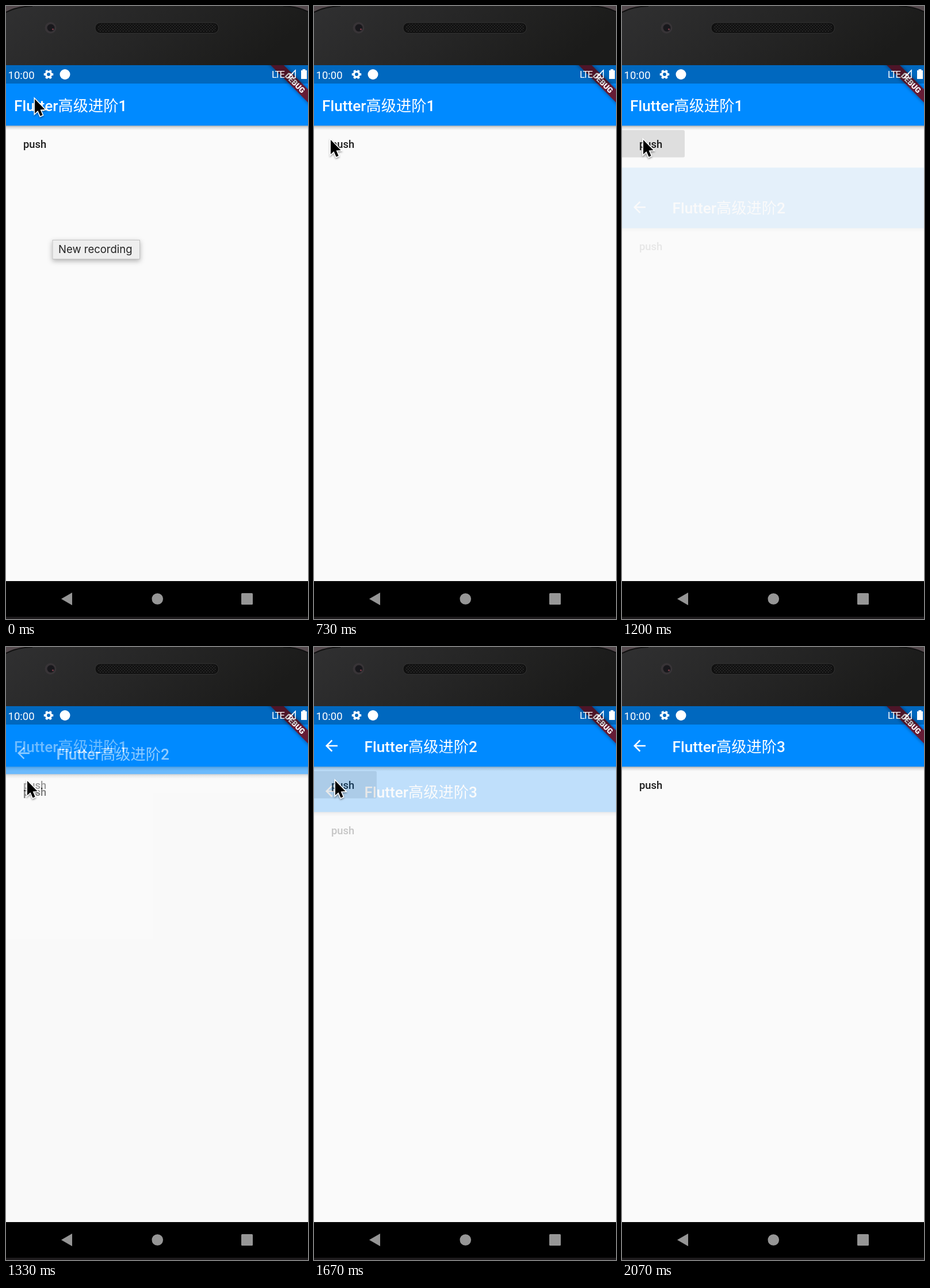
Write an HTML page that moves like this. It is 525x1067 px and loops after 2140 ms.

```html
<!DOCTYPE html>
<html lang="zh-CN">
<head>
<meta charset="utf-8">
<title>Page transitions</title>
<style>
  html, body { margin: 0; width: 100%; height: 100%; overflow: hidden; background: #000; }
  svg { display: block; width: 100%; height: 100%; }
  text { font-family: Roboto, "Noto Sans CJK SC", "Noto Sans CJK", sans-serif; white-space: pre; }
  .title { font-size: 26.25px; font-weight: 500; fill: #fff; }
  .title tspan { font-weight: 400; }
  .label { font-size: 18.4px; font-weight: 500; fill: #1c1c1c; }
</style>
</head>
<body>
<svg viewBox="0 0 525 1067">
  <defs>
    <linearGradient id="body" x1="0" y1="0" x2="1" y2=".25">
      <stop offset="0" stop-color="#303031"/><stop offset=".5" stop-color="#262626"/><stop offset="1" stop-color="#1b1b1a"/>
    </linearGradient>
    <linearGradient id="barShadow" x1="0" y1="0" x2="0" y2="1">
      <stop offset="0" stop-opacity=".3"/><stop offset=".4" stop-opacity=".12"/><stop offset="1" stop-opacity="0"/>
    </linearGradient>
    <pattern id="mesh" width="5" height="5" patternUnits="userSpaceOnUse">
      <circle cx="1.3" cy="1.3" r="1" fill="#303030"/><circle cx="3.8" cy="3.8" r="1" fill="#303030"/>
    </pattern>
    <filter id="soft" x="-50%" y="-80%" width="200%" height="300%">
      <feDropShadow dx="0" dy="3" stdDeviation="4" flood-opacity=".3"/>
    </filter>
    <filter id="cursorShadow" x="-60%" y="-40%" width="220%" height="200%">
      <feDropShadow dx="0" dy="2" stdDeviation="1.8" flood-opacity=".4"/>
    </filter>
    <filter id="bannerShadow" x="-20%" y="-60%" width="140%" height="220%">
      <feDropShadow dx="0" dy="0" stdDeviation="3" flood-opacity=".5"/>
    </filter>
    <clipPath id="screen"><path d="M0 103H525V1001H0z"/></clipPath>
    <clipPath id="button"><rect x="-8" y="216" width="117" height="47.5" rx="2.5"/></clipPath>
  </defs>

  <!-- phone body -->
  <rect width="525" height="110" fill="#554a4e"/>
  <path d="M0 110V11Q18 1 46 0H482Q508 1 525 10V110z" fill="url(#body)"/>
  <path d="M0 11Q18 1 46 0M482 0Q508 1 525 10" fill="none" stroke="#111" stroke-width="2"/>
  <circle cx="77.500" cy="38" r="10" fill="#383437"/>
  <circle cx="78" cy="38" r="6.500" fill="#19181c"/>
  <circle cx="81.500" cy="40.500" r="1.500" fill="#7a3d48"/>
  <rect x="155" y="29" width="214.500" height="18.500" rx="9" fill="#101010" stroke="#3a3a3a" stroke-width=".8"/>
  <rect x="159" y="31" width="207" height="14.500" rx="7" fill="url(#mesh)"/>

  <g clip-path="url(#screen)">
    <g id="pages"></g>
    <g transform="translate(502.500 134) rotate(45)">
      <rect x="-80" y="-8" width="160" height="16" fill="#661c34" filter="url(#bannerShadow)"/>
      <text y="4.800" text-anchor="middle" font-size="13.400" font-weight="900" fill="#fff">DEBUG</text>
    </g>
  </g>

  <!-- status bar -->
  <path d="M0 103H525V135H0z" opacity=".25"/>
  <g fill="#fff">
    <text x="3.500" y="126.500" font-size="18.500">10:00</text>
    <g transform="translate(74 119)" fill="none" stroke="#fff">
      <circle r="4.600" stroke-width="3.400"/>
      <circle r="7" stroke-width="2.600" pathLength="12" stroke-dasharray="1.1 .9" stroke-dashoffset=".55"/>
    </g>
    <circle cx="102.500" cy="119" r="9"/>
    <text x="462" y="125" font-size="16.500" letter-spacing="-1.500">LTE</text>
    <path d="M503 112V125H490z" fill="none" stroke="#fff" stroke-width="1.600"/>
    <path d="M493 117l6 6m0-6l-6 6" stroke="#fff" stroke-width="1.600"/>
    <path d="M513 112h2.500v-2h5v2h2.500v15h-10z"/>
  </g>

  <!-- navigation bar -->
  <path d="M0 1001H525V1067H0z"/>
  <path d="M0 1063H525V1067H0z" fill="#1d1a1c"/>
  <g fill="#969696">
    <path d="M96 1032L115 1021V1043z"/>
    <circle cx="263.300" cy="1032" r="9.800"/>
    <rect x="409" y="1022" width="20" height="20" rx="1.500"/>
  </g>

  <g id="tooltip">
    <rect x="81" y="407.500" width="151.500" height="33" fill="#eee" stroke="#c2c2c2" filter="url(#soft)"/>
    <text x="91" y="430" font-size="18.500" fill="#222" style="font-family:Inter,sans-serif">New recording</text>
  </g>
  <path id="cursor" d="M0 0V25L5.500 20L9.600 29.500L13.600 27.800L9.600 18.600L17.500 18z"
        stroke="#fff" stroke-width="3" paint-order="stroke" filter="url(#cursorShadow)"/>
</svg>

<script>
const LOOP = 2140, STEP = 200 / 3, SLIDE = 224;
const $ = id => document.getElementById(id);

// press: button goes down; push: the next page starts to enter
const transitions = [
  { press: 960, push: 1133.5, length: 282 },
  { press: 1425, push: 1539, length: 306 },
];
const cursorPath = [
  [0, 50, 162], [70, 47, 172], [270, 31, 226], [400, 27, 233], [667, 27, 233],
  [733, 29, 233], [867, 37, 233], [1667, 37, 233], [1733, 50, 192],
  [1800, 97, 39], [1867, 125, -8], [1933, 135, -45],
];

const clamp = v => Math.min(1, Math.max(0, v));
const ramp = (t, from, to) => clamp((t - from) / (to - from));

function bezier(x1, y1, x2, y2) {
  const at = (a, b, s) => 3 * a * s * (1 - s) ** 2 + 3 * b * s * s * (1 - s) + s ** 3;
  return x => {
    let low = 0, high = 1;
    for (let i = 0; i < 24; i++) {
      const mid = (low + high) / 2;
      if (at(x1, x2, mid) < x) low = mid; else high = mid;
    }
    return at(y1, y2, high);
  };
}
const fastOutSlowIn = bezier(.4, 0, .2, 1);
const easeIn = bezier(.42, 0, 1, 1);

const pageMarkup = n => `
  <g id="page${n}">
    <path d="M0 103H525V1240H0z" fill="#fafafa"/>
    <path d="M0 208H525V216H0z" fill="url(#barShadow)"/>
    <path d="M0 103H525V208.300H0z" fill="#008aff"/>
    ${n > 1 ? `<path transform="translate(14.700 156.200) scale(1.3125)" fill="#fff"
      d="M20 11H7.830l5.590-5.590L12 4l-8 8 8 8 1.410-1.410L7.830 13H20z"/>` : ''}
    <text class="title" x="${n > 1 ? 87.5 : 14}" y="183">Flutter<tspan>高级进阶</tspan>${n}</text>
    <g id="ink${n}" clip-path="url(#button)">
      <path d="M-8 216H109V264H-8z" opacity=".07"/>
      <circle id="splash${n}" cx="37" cy="236" opacity=".043"/>
    </g>
    <text class="label" x="30" y="246.500">push</text>
  </g>`;
$('pages').innerHTML = [1, 2, 3].map(pageMarkup).join('');

function cursorAt(t) {
  const next = cursorPath.findIndex(key => key[0] > t);
  if (next < 0) return cursorPath.at(-1).slice(1);
  const [t0, x0, y0] = cursorPath[next - 1], [t1, x1, y1] = cursorPath[next];
  const p = ramp(t, t0, t1);
  return [x0 + (x1 - x0) * p, y0 + (y1 - y0) * p];
}

function draw(t) {
  transitions.forEach(({ press, push, length }, i) => {
    const p = ramp(t, push, push + length);
    const page = $('page' + (i + 2));
    page.setAttribute('transform', `translate(0 ${SLIDE * (1 - fastOutSlowIn(p))})`);
    page.setAttribute('opacity', p > 0 ? easeIn(p) : 0);

    const ink = ramp(t, press, press + 120) * (1 - ramp(t, push + 120, push + 195));
    $('ink' + (i + 1)).setAttribute('opacity', ink);
    $('splash' + (i + 1)).setAttribute('r', 85 * ramp(t, press, press + 210));
  });
  $('ink3').setAttribute('opacity', 0);
  $('tooltip').setAttribute('opacity', 1 - ramp(t, 20, 260));
  $('cursor').setAttribute('transform', `translate(${cursorAt(t)})`);
}

function recordedTime(t) {
  let i = Math.floor((t + 5) / STEP);
  if (Math.round(i * STEP / 10) * 10 > t) i--;
  return i * STEP;
}

const start = performance.now();
function tick() {
  draw(recordedTime((performance.now() - start) % LOOP));
  requestAnimationFrame(tick);
}
tick();
</script>
</body>
</html>
```
